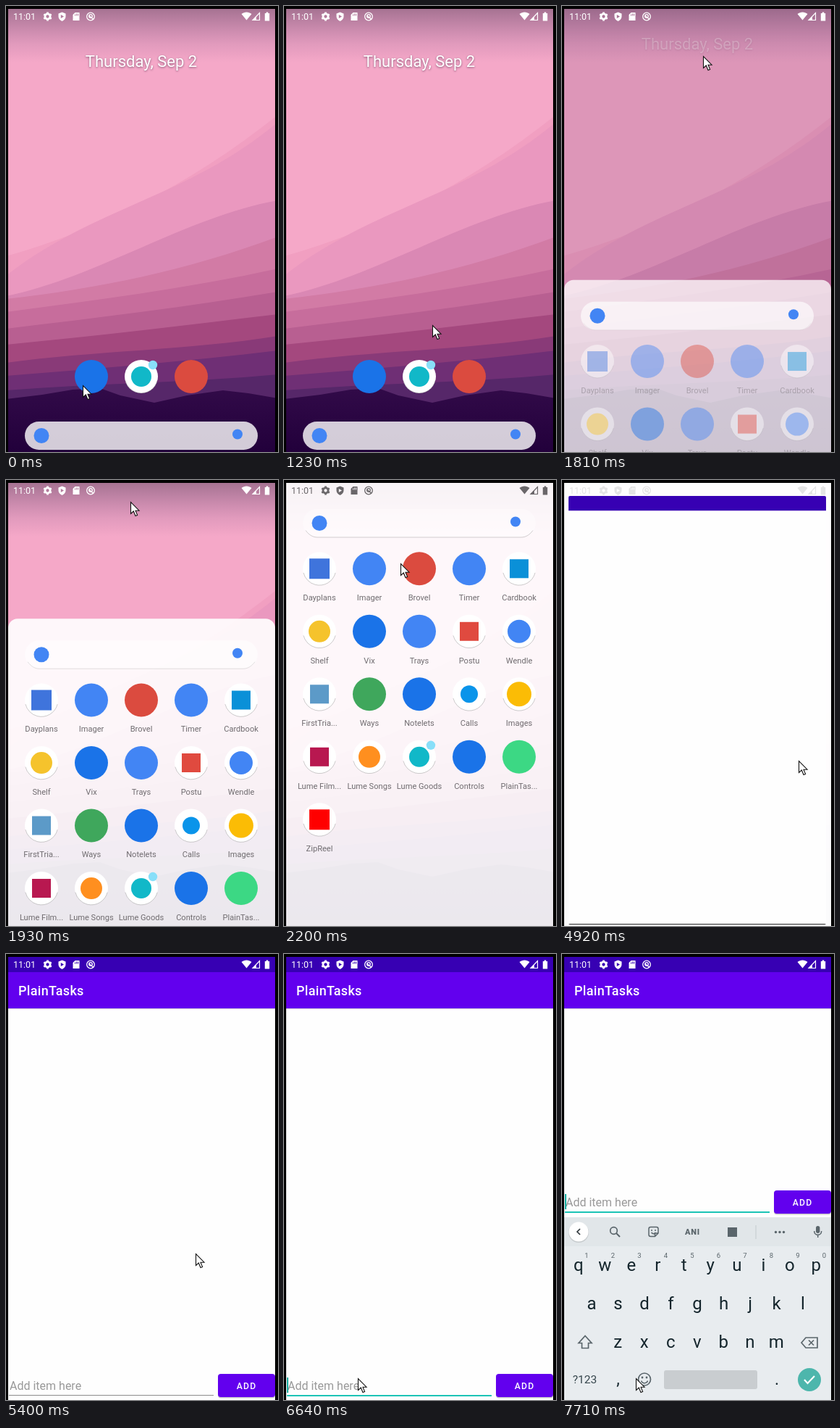
Write an HTML page with a canvas that moves like this. It is 376 px wide and 615 px high and loops after 8 s.

```html
<!DOCTYPE html>
<html lang="en">
<head>
<meta charset="utf-8">
<title>Task list demo</title>
<style>
html, body { margin: 0; width: 100%; height: 100%; overflow: hidden; background: #000; }
canvas { display: block; width: 376px; height: 615px; }
</style>
</head>
<body>
<canvas id="stage" width="376" height="615"></canvas>
<script>
const ctx = document.getElementById('stage').getContext('2d');
const LOOP = 8000;
const FONT = 'Roboto, sans-serif';
const TAU = Math.PI * 2;
const BLUE = '#4285f4', DEEP_BLUE = '#1a73e8';

// [first change, last change, number of changes]
const BURSTS = [[150, 1080, 8], [1230, 1380, 2], [1660, 2470, 7], [3000, 4020, 8], [4170, 5160, 9],
  [5280, 5400, 2], [5680, 6640, 8], [6760, 7150, 4], [7710, 7710, 1]];

// Tracks: [time, values...]
const POINTER = [[0, 106, 523], [420, 170, 480], [680, 251, 505], [1080, 123, 516], [1230, 205, 440],
  [1380, 291, 359], [1660, 240, 160], [1795, 195, 69], [1930, 172, 30], [2065, 163, 70], [2200, 161, 115],
  [2470, 156, 192], [3000, 146, 230], [3291, 143, 265], [3583, 158, 286], [3850, 260, 370], [4020, 323, 409],
  [4418, 326, 400], [4912, 327, 387], [5160, 310, 390], [5400, 262, 413], [6366, 102, 585]];
const DRAWER = [[1380, 0], [1660, .06], [1795, .31], [1930, .66], [2065, .92], [2200, 1]];
const WINDOW = [[4541, 302, 359, 46, 46, 23], [4665, 200, 260, 150, 190, 16], [4789, 50, 90, 300, 460, 8],
  [4912, 9, 22, 356, 591, 2], [5036, 3, 4, 369, 611, 0]];
const KEYBOARD = [[6640, 252], [6760, 170], [6890, 70], [7020, 15], [7150, 0]];

// Contours of the evening sky: left edge, two controls, right edge
const BANDS = [
  [345, 310, 250, 150, '#f19fc1'], [372, 275, 265, 160, '#ea98bf'], [400, 375, 290, 268, '#da88b4'],
  [404, 390, 365, 318, '#d27ba5'], [422, 405, 390, 362, '#c76d9c'], [445, 430, 415, 394, '#b85f91'],
  [467, 455, 440, 425, '#a4487e'], [492, 475, 475, 455, '#893a78'], [510, 500, 490, 475, '#6f2f75'],
  [530, 520, 520, 508, '#562769']];

// label, mark colour, mark radius; full-size marks have no white plate, 's' means a square
const APPS = [
  ['Dayplans', '#3f74dc', 14, 's'], ['Imager', BLUE, 23], ['Brovel', '#db4b3f', 23], ['Timer', BLUE, 23],
  ['Cardbook', '#0a90d8', 13, 's'],
  ['Shelf', '#f5c32c', 15], ['Vix', DEEP_BLUE, 23], ['Trays', BLUE, 23], ['Postu', '#e04a3f', 13, 's'],
  ['Wendle', BLUE, 16],
  ['FirstTria...', '#5c9ac8', 13, 's'], ['Ways', '#3fa75c', 23], ['Notelets', DEEP_BLUE, 23],
  ['Calls', '#0a94ea', 12], ['Images', '#fbbc05', 17],
  ['Lume Film...', '#b81850', 13, 's'], ['Lume Songs', '#ff8f1f', 15], ['Lume Goods', '#11b8c8', 14],
  ['Controls', DEEP_BLUE, 23], ['PlainTas...', '#3cd884', 23],
  ['ZipReel', '#ff0000', 14, 's']];
const BADGED = APPS[17];

const clamp = v => Math.max(0, Math.min(1, v));

function snap(t) {
  let shown = 0;
  for (const [a, b, n] of BURSTS) {
    if (t < a) break;
    const gap = (b - a) / (n - 1) || 1;
    shown = a + gap * Math.min(n - 1, Math.floor((t - a + 14) / gap));
  }
  return shown;
}

function at(track, t) {
  let i = 0;
  while (i < track.length - 1 && track[i + 1][0] <= t) i++;
  const a = track[i], b = track[i + 1] || a;
  const k = a === b ? 0 : clamp((t - a[0]) / (b[0] - a[0]));
  return a.slice(1).map((v, j) => v + (b[j + 1] - v) * k);
}

function rect(x, y, w, h, color, r = 0) {
  ctx.fillStyle = color;
  ctx.beginPath();
  ctx.roundRect(x, y, w, h, r);
  ctx.fill();
}

function disc(x, y, r, color) {
  ctx.fillStyle = color;
  ctx.beginPath();
  ctx.arc(x, y, r, 0, TAU);
  ctx.fill();
}

function ring(x, y, r, color, width = 1.5, from = 0, to = TAU) {
  ctx.strokeStyle = color;
  ctx.lineWidth = width;
  ctx.beginPath();
  ctx.arc(x, y, r, from, to);
  ctx.stroke();
}

function text(s, x, y, size, color, align = 'center', weight = 400, spacing = 0) {
  ctx.font = `${weight} ${size}px ${FONT}`;
  ctx.fillStyle = color;
  ctx.textAlign = align;
  ctx.letterSpacing = spacing + 'px';
  ctx.fillText(s, x, y);
  ctx.letterSpacing = '0px';
}

function shape(d, x, y, fill, stroke, width = 1.5) {
  const p = new Path2D(d);
  ctx.save();
  ctx.translate(x, y);
  if (fill) { ctx.fillStyle = fill; ctx.fill(p, 'evenodd'); }
  if (stroke) { ctx.strokeStyle = stroke; ctx.lineWidth = width; ctx.stroke(p); }
  ctx.restore();
}

function faded(alpha, draw) {
  if (alpha <= 0) return;
  ctx.save();
  ctx.globalAlpha *= Math.min(1, alpha);
  draw();
  ctx.restore();
}

function gear(x, y, r, color) {
  ring(x, y, r * .62, color, r * .5);
  for (let i = 0; i < 6; i++) {
    const a = i * TAU / 6 + TAU / 12;
    ring(x, y, r * .9, color, r * .3, a - .25, a + .25);
  }
}

function statusBar(color) {
  text('11:01', 10, 19, 12.5, color, 'left');
  gear(57.5, 14.5, 5.8, color);
  shape('M0-6L5-4V0C5 3 3 5 0 6.5C-3 5-5 3-5 0V-4ZM-1.7-2.5V2.5L2.5 0Z', 77.5, 14.5, color);
  shape('M-1.5-5.5H4.5V5.5H-4.5V-2.5ZM-2-3V-1H-1V-3ZM0-4V-1H1V-4ZM2-4V-1H3V-4Z', 97, 14.5, color);
  ring(117, 14.5, 5.3, color, 1.3);
  ring(117, 14, 2.3, color, 1.3);
  shape('M-2-1L4 4', 117, 14.5, null, color);
  shape('M0 5.5L-7-3C-3-6.5 3-6.5 7-3Z', 332.5, 14, color);
  shape('M-5 5L4.5-5V5Z', 346, 14.5, null, color, 1.2);
  shape('M-5 5L0-.5V5Z', 346, 14.5, color);
  shape('M-3.2-4.5H-1.3V-6H1.3V-4.5H3.2V6H-3.2Z', 361, 14.5, color);
}

function wallpaper() {
  rect(0, 0, 376, 615, '#f5a8c8');
  for (const [a, b, c, d, color] of BANDS) {
    ctx.fillStyle = color;
    ctx.beginPath();
    ctx.moveTo(0, a);
    ctx.bezierCurveTo(125, b, 250, c, 376, d);
    ctx.lineTo(376, 615);
    ctx.lineTo(0, 615);
    ctx.fill();
  }
  const ground = ctx.createLinearGradient(0, 530, 0, 615);
  ground.addColorStop(0, '#310a48');
  ground.addColorStop(1, '#22003b');
  shape('M0 542L50 536L92 529L130 527L158 537L205 547L250 537L300 530L335 534L376 541V615H0Z', 0, 0, ground);
  const scrim = ctx.createLinearGradient(0, 4, 0, 78);
  scrim.addColorStop(0, 'rgba(70,50,80,.45)');
  scrim.addColorStop(.65, 'rgba(90,60,110,.13)');
  scrim.addColorStop(1, 'rgba(90,60,110,0)');
  rect(0, 0, 376, 78, scrim);
}

function icon(app, x, y) {
  const [, color, r, kind] = app;
  if (r < 23) {
    disc(x, y, 23, '#fff');
    ring(x, y, 22.8, 'rgba(0,0,0,.2)', 1, .25, Math.PI - .25);
  }
  if (kind) rect(x - r, y - r, r * 2, r * 2, color);
  else disc(x, y, r, color);
  if (app === BADGED) disc(x + 16, y - 16, 6.2, '#88dff9');
}

function searchBar(y, p) {
  rect(26, y - 19.5, 322, 39, `rgba(255,255,255,${.8 - .5 * p})`, 19.5);
  faded(p, () => shape('M30 10C34 16 40 19.5 46 19.5H328C334 19.5 340 16 344 10', 0, y, null, 'rgba(0,0,0,.18)', 1));
  disc(49, y, 10.5, BLUE);
  disc(320, y - 2, 7, BLUE);
}

function launcher(p) {
  wallpaper();
  const shift = 533 * (1 - p);
  faded(.18 * Math.sin(Math.PI * Math.min(1, p * 1.6)), () => rect(0, 0, 376, 615, '#6e466e'));
  faded(1 - p * 2.4, () => {
    ctx.shadowColor = 'rgba(60,30,60,.6)';
    ctx.shadowBlur = 3;
    ctx.shadowOffsetY = 1;
    text('Thursday, Sep 2', 187, 84 - 77 * p, 22, '#fff');
  });
  faded(1 - p * 3.5, () => [APPS[12], BADGED, APPS[2]].forEach((app, i) => icon(app, 118 + 69 * i, 511 - 60 * p)));
  const top = shift + 10 * Math.min(1, (1 - p) * 3);
  faded(Math.min(.91, p * 2.45), () => rect(3, top, 369, 640, '#fff', p < 1 ? 13 : 0));
  searchBar(59.5 + shift, p);
  faded((p - .1) * 2.1, () => APPS.forEach((app, i) => {
    const x = 49 + 69 * (i % 5), y = 122.3 + 86.5 * Math.floor(i / 5) + shift;
    icon(app, x, y);
    text(app[0], x, y + 43.7, 11.1, '#706c70');
  }));
  statusBar(p > .8 ? '#6a676a' : '#fff');
}

function openingWindow(t) {
  const [x, y, w, h, r] = at(WINDOW, t);
  faded(clamp((t - 4300) / 500) * .82, () => rect(3, 4, 369, 611, '#fff'));
  ctx.save();
  ctx.beginPath();
  ctx.roundRect(x, y, w, h, r);
  ctx.clip();
  rect(x, y, w, h, '#fefefe');
  rect(x, y, w, h * .0343, '#3700b3');
  if (t < 5036) rect(x, y + h - 1, w, 1, '#222');
  ctx.restore();
  if (t >= 5036) statusBar('#fff');
}

function todoScreen(t) {
  const lift = t >= 6880 ? 253 : 0;
  const focused = t >= 6490;
  rect(3, 75, 369, 540, '#fefefe');
  rect(3, 75, 369, 1, '#d8d8d8');
  rect(3, 25, 369, 50, '#6200ee');
  text('PlainTasks', 17, 57, 18, '#fff', 'left', 500, .3);
  ctx.save();
  ctx.translate(0, -lift);
  text('Add item here', 5, 601, 16, '#999', 'left');
  if (focused) rect(4, 608, 283, 2, '#1cc4b6');
  else rect(4, 608, 283, 1, '#8c8c8c');
  if (focused && (t < 7140 || t >= 7700)) rect(4, 584, 2, 21, '#12a99c');
  rect(293, 580, 79, 32.5, 'rgba(0,0,0,.2)', 4);
  rect(293, 579, 79, 32, '#6200ee', 4);
  text('ADD', 332.5, 599.5, 12.2, '#fff', 'center', 500, 1.2);
  ctx.restore();
}

function keyboard(drop) {
  const ink = '#14252c', tool = '#5a656b';
  ctx.save();
  ctx.translate(0, drop);
  rect(3, 363, 369, 252, '#e8ecef');
  rect(3, 363, 369, 40, '#e1e6e9');

  disc(23, 384, 14, 'rgba(0,0,0,.12)');
  disc(23, 383, 13.5, '#fff');
  shape('M2-4L-2 0L2 4', 23, 383, null, '#30383c', 1.7);
  ring(71.5, 381.5, 4.8, tool, 1.7);
  shape('M3.5 3.5L8.5 8.5', 71.5, 381.5, null, tool, 2);
  shape('M-4-6.5H4Q6.5-6.5 6.5-4V2L2 6.5H-4Q-6.5 6.5-6.5 4V-4Q-6.5-6.5-4-6.5M6.5 2H2V6.5M-3 1Q0 4.5 3 1', 126.5, 383, null, tool);
  disc(124, 381, 1, tool);
  disc(129, 381, 1, tool);
  text('ANI', 180.5, 387, 11, tool, 'center', 900, .8);
  rect(229, 377, 13, 13, tool);
  rect(267.5, 374, 1, 19, '#c3c9cd');
  for (let i = -1; i < 2; i++) disc(301 + i * 5.5, 383.5, 1.7, tool);
  rect(351, 375, 5.4, 10, tool, 2.7);
  shape('M-5-1C-5 6 5 6 5-1M0 4V8', 353.7, 383, null, tool);

  ['qwertyuiop', 'asdfghjkl', 'zxcvbnm'].forEach((row, r) => [...row].forEach((key, i) => {
    const x = [22.8, 41, 77.3][r] + 36.5 * i;
    text(key, x, 436.5 + 53.3 * r, 24, ink);
    if (!r) text((i + 1) % 10, x + 11, 419, 9.5, tool);
  }));
  shape('M0-9L9 1H4.5V8H-4.5V1H-9Z', 32, 535.5, null, tool, 1.7);
  shape('M-11 0L-5-7H11V7H-5ZM-1-3.5L6 3.5M6-3.5L-1 3.5', 342, 536, null, tool, 1.7);
  text('?123', 31.5, 592, 15.5, '#35454c');
  text(',', 77.5, 594, 23, ink);
  text('.', 297, 594, 23, ink);
  ring(114, 586.5, 8.5, tool, 1.7);
  ring(114, 587, 4.7, tool, 1.6, .3, Math.PI - .3);
  disc(111, 584, 1.4, tool);
  disc(117, 584, 1.4, tool);
  rect(141, 574, 129, 26, '#c9cdd0', 3);
  disc(342, 587, 16, '#4db6ac');
  shape('M-7 0L-2.5 5L7-5', 342, 587, null, '#fff', 2.2);
  ctx.restore();
}

function pointer(x, y) {
  shape('M.5.5V16.5L4.3 13L7 19.5L9.6 18.4L7 12.2H12Z', x, y, '#fff', '#111', 1.1);
}

function render(t) {
  if (t < 5030) launcher(at(DRAWER, t)[0]);
  if (t >= 4541) openingWindow(t);
  if (t >= 5280) faded(t < 5400 ? .5 : 1, () => todoScreen(t));
  if (t >= 6760) keyboard(at(KEYBOARD, t)[0]);
  pointer(...at(POINTER, t).map(Math.round));
  rect(0, 0, 376, 4, '#000');
  rect(0, 0, 3, 615, '#000');
  rect(372, 0, 4, 615, '#000');
}

const start = performance.now();
function frame() {
  render(snap((performance.now() - start) % LOOP));
  requestAnimationFrame(frame);
}
frame();
</script>
</body>
</html>
```
